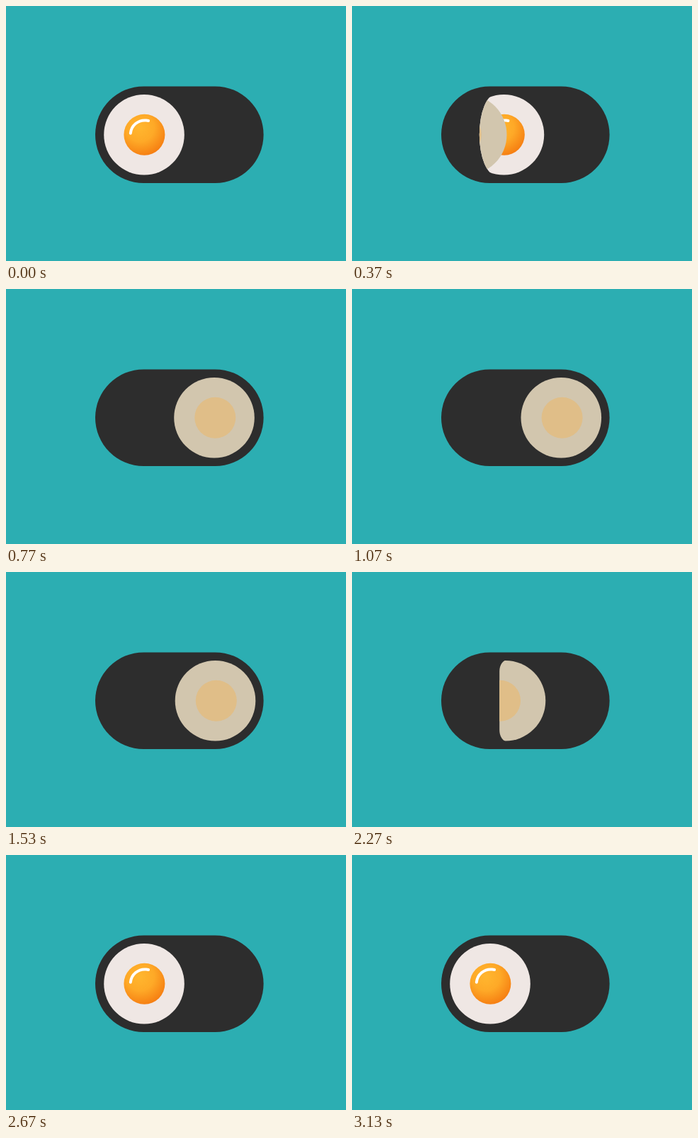
Recreate the animation shown at these times as an HTML page with a canvas. Size 480x360 px, loop 3.56 s.

```html
<!DOCTYPE html>
<html lang="en">
<head>
<meta charset="utf-8">
<title>Egg toggle</title>
<style>
  html, body { margin: 0; width: 100%; height: 100%; overflow: hidden; background: #2caeb2; }
  canvas { display: block; width: 480px; height: 360px; }
</style>
</head>
<body>
<canvas id="stage" width="480" height="360"></canvas>
<script>
const ctx = document.getElementById('stage').getContext('2d');
const LOOP = 3560, STEP = 1000 / 30;
const CY = 181.7, R = 56.8, YOLK = 29;
const WHITE = '#efe7e4', BACK = '#d2c6ae', BACK_YOLK = '#e0be88';

// progress of the flip over time: 0 = sunny side left, 1 = turned over right
const timeline = [
  [0, 0], [200, 0], [233, .015], [267, .07], [300, .14], [333, .24], [367, .38],
  [400, .53], [433, .7], [467, .87], [500, 1],
  [2200, 1], [2233, .86], [2267, .63], [2300, .43], [2333, .27], [2367, .15],
  [2400, .075], [2433, .03], [2500, 0], [LOOP, 0]
];

// progress, fold edge, fold corner rx, ry, front centre, flap centre, flap yolk centre
const poses = [
  [0, 138.2, R, R, 195, 81, 73],
  [.38, 180, 24, R, 214.5, 162, 154],
  [.63, 208, 11, 15, 208, 216, 208.5],
  [1, 238.7, R, R, 230, 295.5, 296.8]
];

function sample(rows, key) {
  let i = 1;
  while (i < rows.length - 1 && rows[i][0] < key) i++;
  const a = rows[i - 1], b = rows[i];
  const k = (key - a[0]) / (b[0] - a[0]);
  return a.map((v, n) => v + (b[n] - v) * k);
}

function sway(t) {
  const s = t - 500;
  if (s < 0 || s > 730) return 0;
  return 4.4 * Math.exp(-s / 250) * Math.sin(2 * Math.PI * s / 360);
}

function disc(x, r, fill) {
  ctx.fillStyle = fill;
  ctx.beginPath();
  ctx.arc(x, CY, r, 0, 2 * Math.PI);
  ctx.fill();
}

function pill() {
  ctx.fillStyle = '#2d2d2d';
  ctx.beginPath();
  ctx.arc(194.3, CY, 68.3, Math.PI / 2, -Math.PI / 2);
  ctx.arc(295.3, CY, 68.3, -Math.PI / 2, Math.PI / 2);
  ctx.fill();
}

function frontSide(x) {
  disc(x, R, WHITE);
  const cx = x + .4;
  const shade = ctx.createRadialGradient(cx - 6, CY - 10, 2, cx - 6, CY - 10, 42);
  shade.addColorStop(0, '#ffb52e');
  shade.addColorStop(.45, '#fea927');
  shade.addColorStop(1, '#f57b10');
  disc(cx, YOLK, shade);
  ctx.strokeStyle = '#fff';
  ctx.lineWidth = 4;
  ctx.lineCap = 'round';
  ctx.beginPath();
  ctx.arc(cx + .6, CY, 20.3, Math.PI * 1.03, Math.PI * 1.58);
  ctx.stroke();
}

// keeps everything right of the rounded fold
function clipFold(edge, rx, ry) {
  const top = CY - R - 1, bottom = CY + R + 1;
  ctx.beginPath();
  ctx.moveTo(480, top);
  ctx.lineTo(edge + rx, top);
  ctx.ellipse(edge + rx, top + ry + 1, rx, ry + 1, 0, -Math.PI / 2, -Math.PI, true);
  ctx.lineTo(edge, bottom - ry - 1);
  ctx.ellipse(edge + rx, bottom - ry - 1, rx, ry + 1, 0, Math.PI, Math.PI / 2, true);
  ctx.lineTo(480, bottom);
  ctx.clip();
}

function draw(t) {
  const p = sample(timeline, t)[1];
  const [, edge, rx, ry, front, flap, flapYolk] = sample(poses, p);
  ctx.fillStyle = '#2caeb2';
  ctx.fillRect(0, 0, 480, 360);
  pill();
  ctx.save();
  ctx.translate(sway(t), 0);
  if (p > 0 && p < 1) clipFold(edge, rx, ry);
  if (flap < front) frontSide(front);
  if (p > 0) {
    disc(flap, R, BACK);
    disc(flapYolk, YOLK, BACK_YOLK);
  }
  ctx.restore();
}

const start = performance.now();
function tick() {
  const t = (performance.now() - start) % LOOP;
  draw(Math.floor((t + 3.4) / STEP) * STEP);
  requestAnimationFrame(tick);
}
tick();
</script>
</body>
</html>
```
